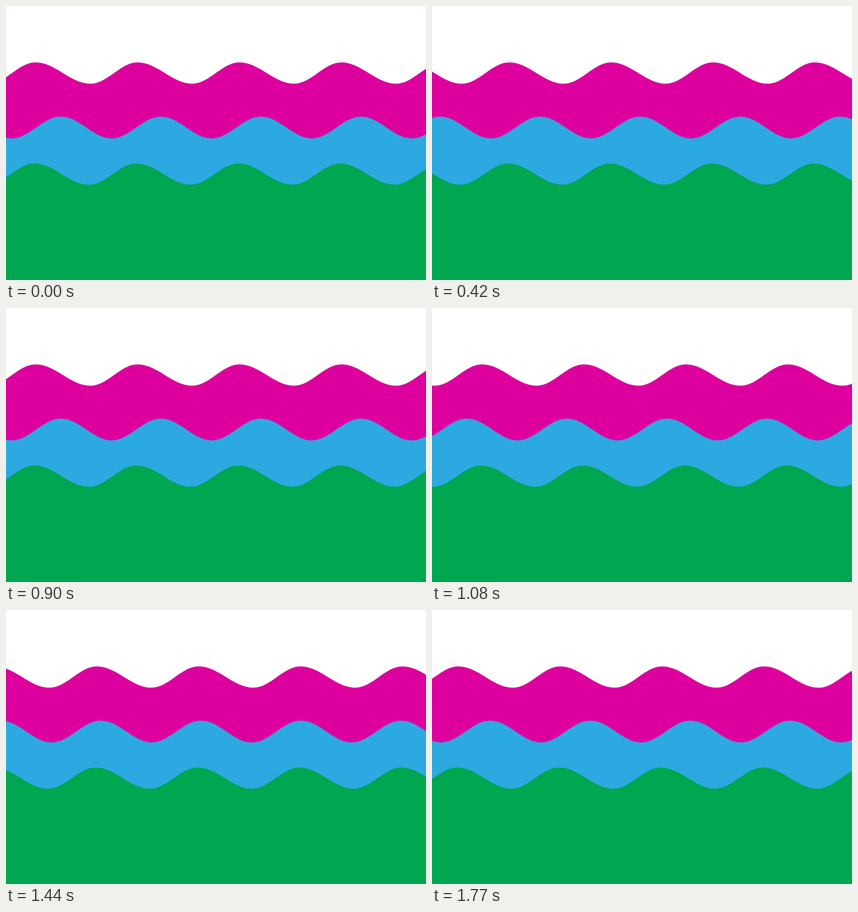
Recreate the animation shown at these times as an HTML page. Size 926 by 605 pixels, loop 1.8 s.

```html
<!DOCTYPE html>
<html lang="en">
<head>
<meta charset="utf-8">
<title>Waves</title>
<style>
  html, body { margin: 0; width: 100%; height: 100%; overflow: hidden; background: #fff; }
  svg { display: block; width: 926px; height: 605px; }
</style>
</head>
<body>
<svg id="stage" viewBox="0 0 926 605"></svg>
<script>
const CYCLE = 900, STEP = 30, WIDTH = 926, HEIGHT = 605;
const EASE = 0.3642; // handle length that makes a cubic follow a half sine

// fall is the horizontal run from crest to trough; dir is the drift direction
const waves = [
  { color: '#dd009e', crestX: 65.3, top: 124.6, bottom: 171.6, period: 224.7, fall: 120.4, dir: 1 },
  { color: '#2ca9e1', crestX: 121, top: 244.2, bottom: 292.4, period: 220.6, fall: 111.8, dir: -1 },
  { color: '#00a650', crestX: 62.8, top: 347.8, bottom: 394.6, period: 224.7, fall: 119.6, dir: 1 }
];

const halfWave = (dx, dy) => `c${dx * EASE} 0 ${dx * (1 - EASE)} ${dy} ${dx} ${dy}`;

function wavePath({ crestX, top, bottom, period, fall }) {
  const start = crestX - 2 * period;
  const count = Math.ceil((WIDTH - start) / period) + 2;
  const rise = bottom - top;
  const cycle = halfWave(fall, rise) + halfWave(period - fall, -rise);
  return `M${start} ${top}${cycle.repeat(count)}V${HEIGHT}H${start}Z`;
}

const stage = document.getElementById('stage');
for (const wave of waves) {
  wave.node = document.createElementNS('http://www.w3.org/2000/svg', 'path');
  wave.node.setAttribute('d', wavePath(wave));
  wave.node.setAttribute('fill', wave.color);
  stage.append(wave.node);
}

function render(time) {
  const progress = Math.floor(time / STEP) * STEP % CYCLE / CYCLE;
  for (const { node, dir, period } of waves) {
    node.setAttribute('transform', `translate(${dir * period * progress} 0)`);
  }
}

const begin = performance.now();
function tick() {
  render(performance.now() - begin);
  requestAnimationFrame(tick);
}
render(0);
requestAnimationFrame(tick);
</script>
</body>
</html>
```
